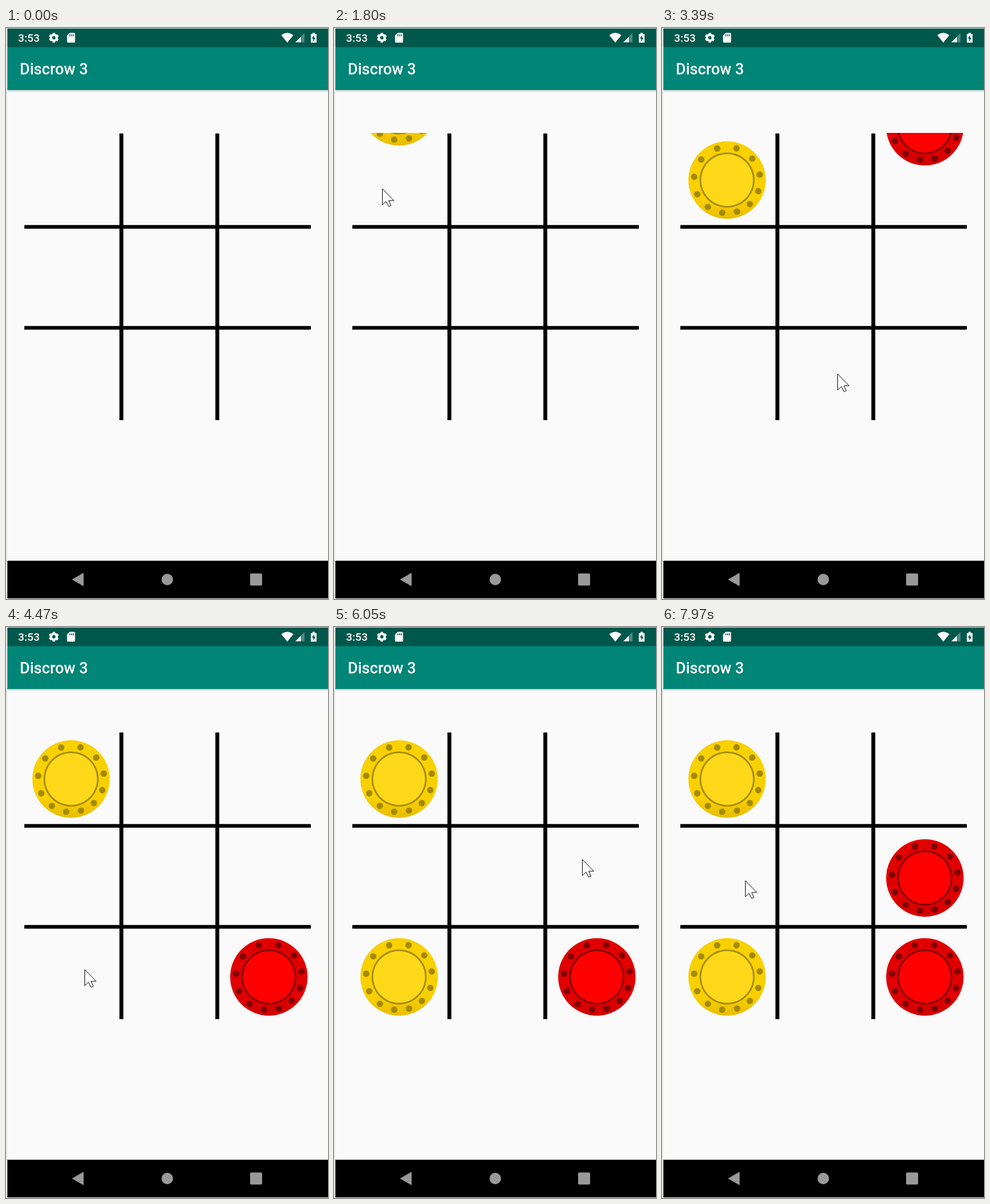
An HTML page with a canvas that plays this animation: 562 by 996 pixels, repeating every 8 s.

```html
<!DOCTYPE html>
<html lang="en">
<head>
<meta charset="utf-8">
<title>Discrow 3</title>
<style>
  html, body { margin: 0; width: 100%; height: 100%; overflow: hidden; background: #fafafa; }
  svg, canvas { position: absolute; left: 0; top: 0; width: 562px; height: 996px; }
  text { font-family: Roboto, sans-serif; font-weight: 500; fill: #fff; }
</style>
</head>
<body>
<svg viewBox="0 0 562 996">
  <defs>
    <linearGradient id="shade" x2="0" y2="1">
      <stop offset="0" stop-color="#cdd2d1"/>
      <stop offset="1" stop-color="#fafafa"/>
    </linearGradient>
  </defs>
  <rect width="562" height="996" fill="#fafafa"/>
  <rect y="108" width="562" height="5" fill="url(#shade)"/>
  <rect y="1" width="562" height="33" fill="#00574b"/>
  <rect y="33.5" width="562" height="74.7" fill="#008577"/>
  <rect y="929.3" width="562" height="65.7" fill="#000"/>
  <rect width="2.4" height="996" fill="#ebebeb"/>
  <rect width="562" height="1" fill="#dfe5e4"/>

  <text x="21" y="24" font-size="19.2">3:53</text>
  <text x="24" y="81" font-size="27">Discrow 3</text>

  <g fill="none" stroke="#fff" transform="rotate(90 83.5 17)">
    <circle cx="83.5" cy="17" r="5" stroke-width="4.2"/>
    <circle cx="83.5" cy="17" r="7.4" stroke-width="2.4" stroke-dasharray="4.4 3.349" stroke-dashoffset="2.2"/>
  </g>
  <path d="M111 8.5h8q1.5 0 1.5 1.5v14q0 1.5-1.5 1.5h-11q-1.5 0-1.5-1.5V13z" fill="#fff"/>
  <path d="M111.5 11v3.500M114.5 11v3.500M117.5 11v3.500" stroke="#00574b" stroke-width="1.5"/>
  <path d="M480.5 12.500Q491 4.500 501.500 12.500L491 25.500z" fill="#fff"/>
  <path d="M521 8.500V25H505z" fill="#4c8981"/>
  <path d="M514.500 15.500V25H505z" fill="#fff"/>
  <path d="M535 8.500h4v2h3V25.500h-10V10.500h3z" fill="#fff"/>
  <path d="M537.800 12.500v4.500h2.400l-4 6.500v-5h-2.400z" fill="#00574b"/>

  <g fill="#999">
    <path d="M116 962L135 951V973z" stroke="#999" stroke-linejoin="round"/>
    <circle cx="281.500" cy="962" r="10"/>
    <rect x="426" y="951.500" width="21" height="21" rx="2"/>
  </g>
</svg>
<canvas id="board" width="562" height="996"></canvas>
<script>
const ctx = document.getElementById('board').getContext('2d');
const LOOP = 8000, TOP = 183, CELL = 172.6, FALL = 780, FALL_MS = 660;
const { PI, sin, cos } = Math;

const YELLOW = { rim: '#f9d000', edge: '#e9bd00', face: '#ffd81a', mark: '#a38a00' };
const RED = { rim: '#e00000', edge: '#cf0000', face: '#ff0000', mark: '#7d0000' };

const chips = [
  { col: 0, row: 0, land: 1975, look: YELLOW },
  { col: 2, row: 2, land: 3746, look: RED },
  { col: 0, row: 2, land: 5030, look: YELLOW },
  { col: 2, row: 1, land: 6600, look: RED }
];

// Pointer strokes: each ends at x, y and bows sideways by bx, by
const ENTRY = { x: 401, y: 800 };
const strokes = [
  { from: 230, to: 970, x: 84, y: 280, bx: -140, by: 0, power: 2 },
  { from: 2060, to: 2720, x: 412, y: 587, bx: 0, by: 0, power: 2 },
  { from: 3275, to: 3810, x: 137, y: 597, bx: 0, by: 13, power: 2 },
  { from: 4682, to: 5470, x: 433, y: 405, bx: 0, by: -158, power: 2 },
  { from: 6860, to: 7970, x: 145, y: 442, bx: 0, by: -12, power: 1 }
];
const clicks = [[1300, 1460], [2880, 3130], [4220, 4470], [5910, 6050]];

// The picture refreshes in bursts: start, interval, count
const bursts = [
  [0, 0, 1], [230, 82, 10], [1800, 85, 3], [2130, 84, 8], [3320, 70, 8],
  [4650, 82, 10], [5470, 0, 1], [6480, 90, 3], [6880, 83, 10], [7720, 83, 4]
];
const ticks = bursts
  .flatMap(([from, gap, n]) => Array.from({ length: n }, (_, i) => from + gap * i))
  .concat(clicks.flat());

function disc(x, y, r, fill) {
  ctx.beginPath();
  ctx.arc(x, y, r, 0, PI * 2);
  ctx.fillStyle = fill;
  ctx.fill();
}

function drawGrid() {
  ctx.fillStyle = '#000';
  for (const x of [198, 365.4]) ctx.fillRect(x, 184, 6.8, 500);
  for (const y of [343.7, 519.8]) ctx.fillRect(32, y, 500, 6.4);
}

function drawChip({ col, row, land, look }, t) {
  const left = Math.min(Math.max((land - t) / FALL_MS, 0), 1);
  const x = 113.6 + CELL * col;
  const y = 265.2 + CELL * row - FALL * sin(left * PI / 2) ** 2;
  const rim = ctx.createLinearGradient(0, y - 67, 0, y + 67);
  rim.addColorStop(0, look.rim);
  rim.addColorStop(0.75, look.rim);
  rim.addColorStop(1, look.edge);
  disc(x, y, 67.6, rim);
  for (let i = 0; i < 12; i++) {
    const turn = i * PI / 6;
    const a = turn - 1.876 + 0.14 * sin(turn);
    disc(x + 57.7 * cos(a), y + 57.7 * sin(a), 5.6, look.mark);
  }
  disc(x, y, 48, look.mark);
  disc(x, y, 45.2, look.face);
}

function pointerAt(t) {
  let { x, y } = ENTRY;
  for (const s of strokes) {
    if (t < s.from) break;
    const u = Math.min((t - s.from) / (s.to - s.from), 1);
    const k = 1 - (1 - u) ** s.power;
    const bow = sin(PI * k);
    x += (s.x - x) * k + s.bx * bow;
    y += (s.y - y) * k + s.by * bow;
  }
  return [Math.round(x), Math.round(y)];
}

const arrow = new Path2D('M0 0V28L6.5 22L11 31L15 29.3L11 20.5H20z');

function drawPointer(t) {
  if (t < strokes[0].from) return;
  const [x, y] = pointerAt(t);
  if (clicks.some(([down, up]) => t >= down && t < up)) {
    disc(x, y, 20, 'rgba(255,255,0,0.47)');
  }
  ctx.save();
  ctx.translate(x + 0.5, y + 0.5);
  ctx.fillStyle = '#fff';
  ctx.fill(arrow);
  ctx.strokeStyle = '#000';
  ctx.stroke(arrow);
  ctx.restore();
}

function draw(now) {
  const clock = now % LOOP;
  const t = Math.max(...ticks.filter(tick => tick <= clock));
  ctx.clearRect(0, 0, 562, 996);
  drawGrid();
  ctx.save();
  ctx.beginPath();
  ctx.rect(0, TOP, 562, 502);
  ctx.clip();
  chips.forEach(chip => drawChip(chip, t));
  ctx.restore();
  drawPointer(t);
}

const start = performance.now();
function frame() {
  draw(Math.max(performance.now() - start, 0));
  requestAnimationFrame(frame);
}
frame();
</script>
</body>
</html>
```
